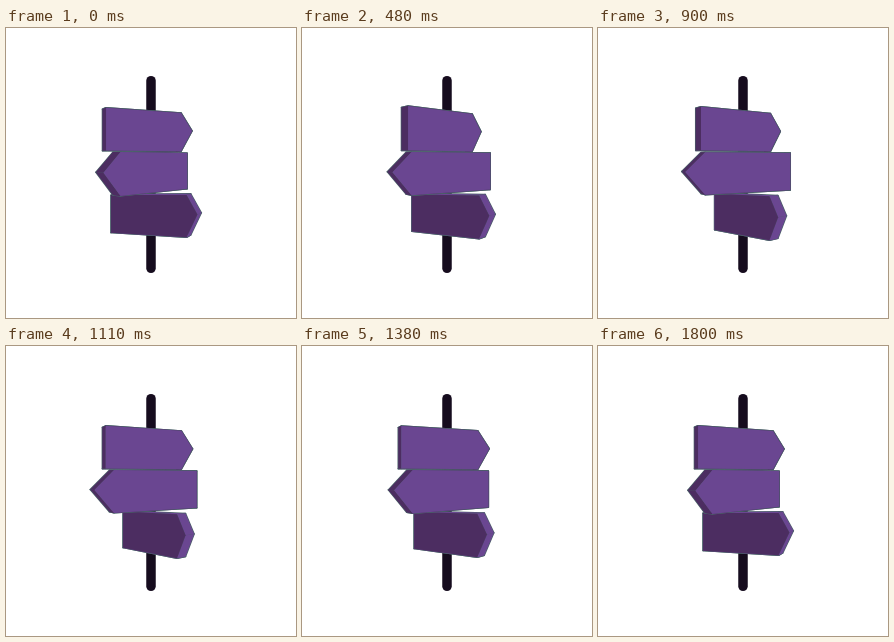
Write an HTML page with a canvas that moves like this. It is 290 by 290 pixels and loops after 1.83 s.

```html
<!DOCTYPE html>
<html>
<head>
<meta charset="utf-8">
<style>
html, body { margin: 0; height: 100%; overflow: hidden; background: #fff; }
canvas { display: block; }
</style>
</head>
<body>
<canvas id="stage" width="290" height="290"></canvas>
<script>
const ctx = document.getElementById('stage').getContext('2d');
const LOOP = 1830, STEP = 30;
const POST_X = 145, HORIZON = 130, CAMERA = 330;
const HEIGHT = 40, DEPTH = 11;
const LIGHT = '#6a4691', DARK = '#4c2d61', EDGE = '#4a5f68', BLACK = '#160c1e';

// Back to front. Lengths run from the post; y is the top edge below the horizon;
// swing lists [ms, degrees] turning points.
const signs = [
  { tail: -47.7, neck: 38.5, tip: 49.3, y: 36.9, tilt: -0.055, face: DARK, side: LIGHT,
    swing: [[0, -28], [1050, -51], [LOOP, -28]] },
  { tail: -47.3, neck: 34.5, tip: 48.2, y: -47, tilt: 0, face: LIGHT, side: DARK,
    swing: [[0, 26.3], [620, 42.7], [1240, 23], [LOOP, 26.3]] },
  { tail: 57, neck: -40.7, tip: -60, y: -5.5, tilt: 0, face: LIGHT, side: DARK,
    swing: [[0, 45.6], [850, 27.5], [LOOP, 45.6]] }
];

function angleAt(swing, t) {
  const i = swing.findIndex(key => key[0] > t);
  const [t0, a] = swing[i - 1], [t1, b] = swing[i];
  const s = (1 - Math.cos(Math.PI * (t - t0) / (t1 - t0))) / 2;
  return (a + (b - a) * s) * Math.PI / 180;
}

// Turn a point about the post and view it in perspective
function project(x, y, z, angle) {
  const c = Math.cos(angle), s = Math.sin(angle);
  const k = CAMERA / (CAMERA + x * s + z * c);
  return [POST_X + (x * c - z * s) * k, HORIZON + y * k];
}

function toPath(points) {
  const path = new Path2D();
  for (const p of points) path.lineTo(...p);
  path.closePath();
  return path;
}

function drawSign({ tail, neck, tip, y, tilt, face, side, swing }, t) {
  const angle = angleAt(swing, t);
  const shape = [[tail, 0], [neck, 0], [tip, HEIGHT / 2 - 1.8], [neck, HEIGHT], [tail, HEIGHT]];
  const panel = z => shape.map(([x, dy]) => project(x, y + dy + tilt * x, z, angle));
  const front = panel(-1), back = panel(DEPTH - 1);
  const sides = front.map((p, i) => {
    const j = (i + 1) % front.length;
    return toPath([p, front[j], back[j], back[i]]);
  });
  const faces = [...sides, toPath(front)];

  ctx.strokeStyle = EDGE;
  ctx.lineWidth = 1.4;
  ctx.lineCap = 'butt';
  ctx.lineJoin = 'round';
  faces.forEach(path => ctx.stroke(path));
  faces.forEach((path, i) => {
    ctx.fillStyle = i < sides.length ? side : face;
    ctx.fill(path);
  });
}

function drawPost() {
  ctx.strokeStyle = BLACK;
  ctx.lineWidth = 9.5;
  ctx.lineCap = 'round';
  ctx.beginPath();
  ctx.moveTo(POST_X, 52.7);
  ctx.lineTo(POST_X, 240.3);
  ctx.stroke();
}

const start = performance.now();
function tick() {
  const t = Math.floor((performance.now() - start) % LOOP / STEP) * STEP;
  ctx.clearRect(0, 0, 290, 290);
  drawPost();
  signs.forEach(sign => drawSign(sign, t));
  requestAnimationFrame(tick);
}
tick();
</script>
</body>
</html>
```
